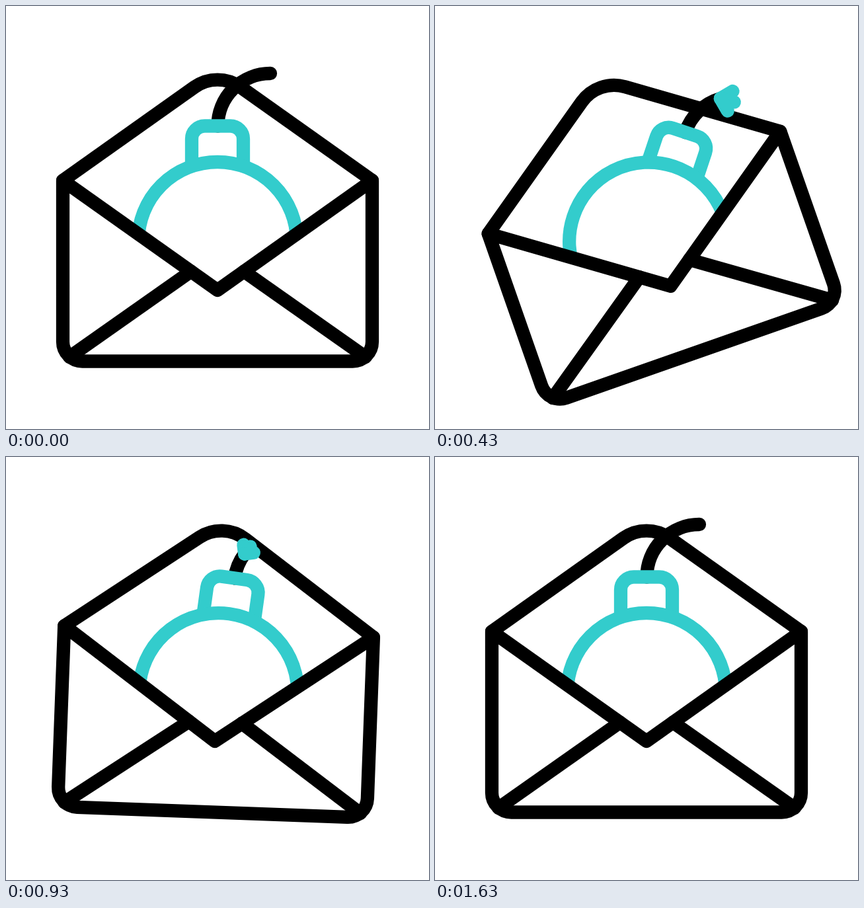
These frames come from a looping animation (640 by 640 pixels, 1.67 s). An HTML page with a canvas:

```html
<!DOCTYPE html>
<html lang="en">
<head>
<meta charset="utf-8">
<title>Mail bomb</title>
<style>
  html, body { margin: 0; width: 100%; height: 100%; overflow: hidden; background: #fff; }
  canvas { display: block; width: 100vmin; height: 100vmin; margin: 0 auto; }
</style>
</head>
<body>
<canvas id="stage" width="640" height="640"></canvas>
<script>
const ctx = document.getElementById('stage').getContext('2d');
const LOOP = 1670, TICK = 1000 / 30, LAST_TICK = 49;
const INK = '#000', TEAL = '#33cccc';
const RAD = Math.PI / 180;

// Swings: first peak at `first`, then one peak per BEAT (ticks), dying out.
const BEAT = 9.3;
const ENVELOPE = { start: 0.6, first: 12.3, peaks: [-20, 23.5, -4.3, 0.3, 0] };
const BOMB = { start: 0, first: 10.3, peaks: [27.6, -17.4, 8.6, -3.1, 0] };

// The fuse burns down until BURN_END, then grows back by the end of the loop.
const BURN_END = 29, SPARK_END = 31;
const FUSE = { x: 400, y: 181.5, r: 79.5, min: 28.5, max: 90 };

const clamp = x => Math.min(1, Math.max(0, x));
const ease = x => x * x * (3 - 2 * x);

function swing({ start, first, peaks }, tick) {
  if (tick < first) return peaks[0] * ease(clamp((tick - start) / (first - start)));
  const beats = (tick - first) / BEAT, i = Math.floor(beats);
  const from = peaks[i] ?? 0, to = peaks[i + 1] ?? 0;
  return from + (to - from) * ease(beats - i);
}

function fuseSweep(tick) {
  const left = tick < BURN_END
    ? (1 - tick / BURN_END) ** 1.4
    : (tick - BURN_END) / (LAST_TICK - BURN_END);
  return (FUSE.min + (FUSE.max - FUSE.min) * left) * RAD;
}

function spin(x, y, degrees) {
  ctx.translate(x, y);
  ctx.rotate(degrees * RAD);
  ctx.translate(-x, -y);
}

function withTilt(x, y, degrees, draw) {
  ctx.save();
  spin(x, y, degrees);
  draw();
  ctx.restore();
}

function line(x1, y1, x2, y2) {
  ctx.beginPath();
  ctx.moveTo(x1, y1);
  ctx.lineTo(x2, y2);
  ctx.stroke();
}

function drawFlap() {
  ctx.strokeStyle = INK;
  ctx.beginPath();
  ctx.moveTo(86, 264);
  ctx.arcTo(320, 98, 554, 264, 60);
  ctx.lineTo(554, 264);
  ctx.stroke();
}

function drawFront() {
  ctx.strokeStyle = INK;
  ctx.beginPath();
  ctx.moveTo(86, 264);
  ctx.arcTo(86, 537.5, 320, 537.5, 29.5);
  ctx.arcTo(554, 537.5, 554, 264, 29.5);
  ctx.lineTo(554, 264);
  ctx.lineTo(320, 430);
  ctx.closePath();
  ctx.stroke();
  line(96, 531, 280, 401.5);
  line(544, 531, 360, 401.5);
}

// Keeps the bomb above the front edge of the envelope.
function clipToPocket(tilt) {
  spin(320, 320, tilt);
  ctx.beginPath();
  ctx.moveTo(86, 264);
  ctx.lineTo(320, 430);
  ctx.lineTo(554, 264);
  ctx.lineTo(1000, -400);
  ctx.lineTo(-360, -400);
  ctx.clip();
  spin(320, 320, -tilt);
}

function drawSpark(tick, sweep) {
  const x = FUSE.x - FUSE.r * Math.cos(sweep);
  const y = FUSE.y - FUSE.r * Math.sin(sweep);
  const size = 23.5 * Math.sin(Math.PI * tick / 35);
  const turn = -3.75 * Math.max(0, tick - 12);
  for (const spread of [-45, 0, 45]) {
    const a = (turn + spread) * RAD;
    line(x, y, x + size * Math.cos(a), y + size * Math.sin(a));
  }
}

function drawBomb(tick) {
  const sweep = fuseSweep(tick);
  ctx.strokeStyle = INK;
  ctx.beginPath();
  ctx.arc(FUSE.x, FUSE.y, FUSE.r, Math.PI, Math.PI + sweep);
  ctx.stroke();

  ctx.strokeStyle = TEAL;
  ctx.beginPath();
  ctx.moveTo(281, 241);
  ctx.arcTo(281, 181.5, 320, 181.5, 19.5);
  ctx.arcTo(359, 181.5, 359, 241, 19.5);
  ctx.lineTo(359, 241);
  ctx.stroke();

  ctx.beginPath();
  ctx.arc(320, 356, 120, 0, 2 * Math.PI);
  ctx.stroke();

  if (tick > 0 && tick < SPARK_END) drawSpark(tick, sweep);
}

function render(ms) {
  const tick = Math.min(LAST_TICK, Math.floor((ms % LOOP + 4) / TICK));
  const tilt = swing(ENVELOPE, tick);

  ctx.fillStyle = '#fff';
  ctx.fillRect(0, 0, 640, 640);
  ctx.lineWidth = 20.3;
  ctx.lineCap = ctx.lineJoin = 'round';

  withTilt(320, 320, tilt, drawFlap);
  ctx.save();
  clipToPocket(tilt);
  withTilt(320, 366, swing(BOMB, tick), () => drawBomb(tick));
  ctx.restore();
  withTilt(320, 320, tilt, drawFront);
}

let start = null;
function loop(now) {
  if (start === null) start = now;
  render(Math.max(0, now - start));
  requestAnimationFrame(loop);
}
render(0);
requestAnimationFrame(loop);
</script>
</body>
</html>
```
